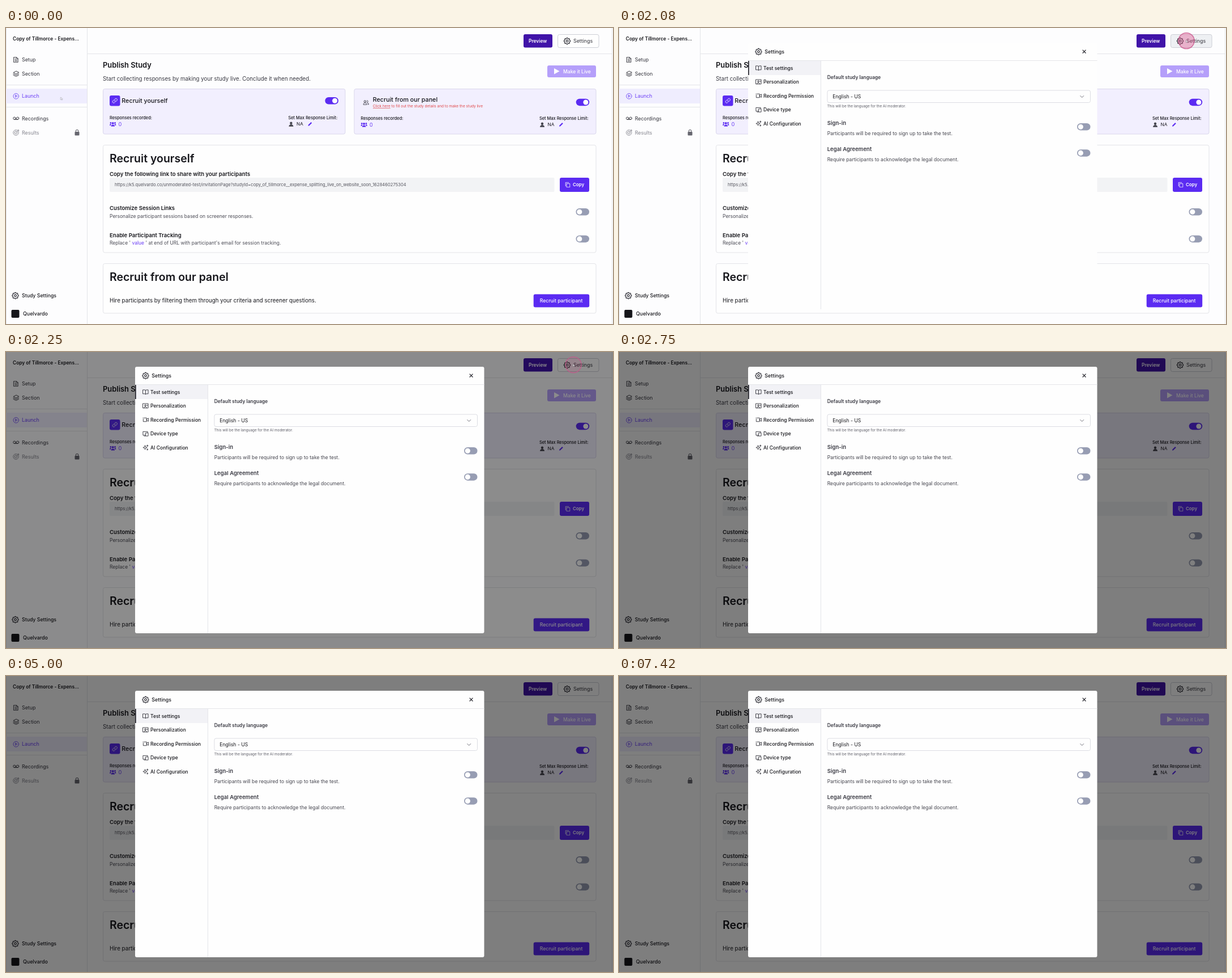
These frames come from a looping animation (1072x522 px, 8000 ms). An HTML page:

```html
<!DOCTYPE html>
<html lang="en">
<head>
<meta charset="utf-8">
<title>Study settings</title>
<style>
  html, body { margin: 0; width: 100%; height: 100%; overflow: hidden; background: #fdfdfe; }
  svg.stage { display: block; width: 100%; height: 100%; }
  text { font-family: Inter, "Open Sans", sans-serif; font-optical-sizing: none; fill: #17171c; }
  .h1 { font-size: 19.5px; font-weight: 600; }
  .h2 { font-size: 12.9px; font-weight: 600; }
  .h3 { font-size: 10.75px; font-weight: 500; }
  .h4 { font-size: 9.57px; font-weight: 600; }
  .lead { font-size: 9.78px; }
  .body { font-size: 8.5px; fill: #4a4a54; }
  .note { font-size: 8.64px; fill: #45454e; }
  .nav { font-size: 8.9px; fill: #33333b; }
  .tab { font-size: 8.57px; font-weight: 500; }
  .label { font-size: 7.4px; font-weight: 500; }
  .tiny { font-size: 6.5px; }
  .btn { font-size: 8.6px; font-weight: 500; fill: #fff; }
  .bold { font-weight: 600; }
  .violet { fill: #6a3df5; }
  .muted { fill: #85858e; }
  .soft { fill: #3a3a43; }
  .panel { fill: #fefefe; stroke: #e3e4e8; }
  .card { fill: #f2effe; stroke: #dad7ec; }
  .rule { stroke: #e4e5e9; fill: none; }
  .main { fill: #5b2bf2; }
  .ico { fill: none; stroke: #2b2b33; stroke-width: 1.9; stroke-linecap: round; stroke-linejoin: round; }
  .ico.purple { stroke: #6f49f5; }
  .ico.grey { stroke: #85858e; }
  .ico.white { stroke: #fff; }

  .hover, .dim, .modal, .ring, .fill, .cursor { animation: 8s linear infinite; }
  .hover { animation-name: hover; }
  .dim { animation-name: dim; }
  .modal { animation-name: modal; }
  .ring { animation-name: ring; transform-origin: 1002px 22.5px; }
  .fill { animation-name: fill; }
  .cursor { animation-name: travel; }

  @keyframes hover {
    0%, 14.9% { fill: #fefefe; }
    15%, 26.9% { fill: #eef0f3; }
    27%, 100% { fill: #fefefe; }
  }
  @keyframes modal {
    0%, 24.5% { opacity: 0; }
    25.75%, 100% { opacity: 1; }
  }
  @keyframes dim {
    0%, 26% { opacity: 0; }
    27.125% { opacity: .17; }
    28.125% { opacity: .45; }
    29.25%, 100% { opacity: .5; }
  }
  @keyframes ring {
    0%, 23.9% { opacity: 0; transform: scale(.4); }
    25% { opacity: 1; transform: scale(1); }
    28.2% { opacity: .85; transform: scale(1); }
    30.25%, 100% { opacity: 0; transform: scale(1.04); }
  }
  @keyframes fill {
    0%, 27.2% { opacity: 1; }
    28.2% { opacity: .3; }
    29.5%, 100% { opacity: 0; }
  }
  @keyframes travel {
    0%, 1% { transform: translate(96.5px, 122px); opacity: .7; animation-timing-function: cubic-bezier(.45, 0, .3, 1); }
    15.6%, 29% { transform: translate(1001px, 21px); opacity: .7; }
    30.25%, 100% { transform: translate(1001px, 21px); opacity: 0; }
  }
</style>
</head>
<body>
<svg class="stage" viewBox="0 0 1072 522" xmlns="http://www.w3.org/2000/svg">
  <defs>
    <symbol id="gear" viewBox="0 0 24 24">
      <path d="M10.3 4.3c.4-1.8 2.9-1.8 3.4 0a1.7 1.7 0 0 0 2.6 1.1c1.5-.9 3.3.8 2.4 2.4a1.7 1.7 0 0 0 1 2.5c1.8.4 1.8 2.9 0 3.4a1.7 1.7 0 0 0-1 2.6c.9 1.5-.8 3.3-2.4 2.4a1.7 1.7 0 0 0-2.6 1c-.4 1.8-2.9 1.8-3.4 0a1.7 1.7 0 0 0-2.6-1c-1.5.9-3.3-.8-2.4-2.4a1.7 1.7 0 0 0-1-2.6c-1.8-.4-1.8-2.9 0-3.4a1.7 1.7 0 0 0 1-2.5c-.9-1.5.8-3.3 2.4-2.4 1 .6 2.3.1 2.6-1.1z"/>
      <circle cx="12" cy="12" r="3"/>
    </symbol>
    <symbol id="file" viewBox="0 0 24 24"><path d="M4 2.5h11l5 5v14H4zM14.5 3v5H20M8 8h3M8 12.5h8M8 17h8"/></symbol>
    <symbol id="layers" viewBox="0 0 24 24"><path d="M12 2.5 2 7.5l10 5 10-5zM2 12.2l10 5 10-5M2 16.8l10 5 10-5"/></symbol>
    <symbol id="play" viewBox="0 0 24 24"><circle cx="12" cy="12" r="10"/><path d="M9.5 8v8l6.5-4z"/></symbol>
    <symbol id="tape" viewBox="0 0 24 24"><circle cx="6" cy="12" r="4.5"/><circle cx="18" cy="12" r="4.5"/><path d="M6 16.5h12"/></symbol>
    <symbol id="target" viewBox="0 0 24 24"><path d="M21 9a10 10 0 1 1-6-6M16.5 11a5 5 0 1 1-3.5-3.7M12 12l6-6V3l3-1v2h2l-2 3h-3"/></symbol>
    <symbol id="link" viewBox="0 0 24 24"><path d="M10 13.5a5 5 0 0 0 7.5.5l3-3a5 5 0 0 0-7-7l-1.8 1.7M14 10.5a5 5 0 0 0-7.5-.5l-3 3a5 5 0 0 0 7 7l1.7-1.7"/></symbol>
    <symbol id="copy" viewBox="0 0 24 24"><path d="M8 7h13v15H8zM4 17H3V2h13v1"/></symbol>
    <symbol id="people" viewBox="0 0 24 24"><circle cx="8" cy="8" r="4"/><path d="M1 20c0-9 14-9 14 0zM16 4a4 4 0 0 1 0 8M18 14c3 0 5 2 5 6h-4"/></symbol>
    <symbol id="book" viewBox="0 0 24 24"><path d="M12 5v16M2 4h7l3 2 3-2h7v15h-7l-3 2-3-2H2z"/></symbol>
    <symbol id="badge" viewBox="0 0 24 24"><path d="M2 3h20v17H2zM6 20c0-7 10-7 10 0M19 8v4"/><circle cx="11" cy="10" r="3"/></symbol>
    <symbol id="camera" viewBox="0 0 24 24"><path d="M6 5h10v14H3V9M16 10l7-4v12l-7-4zM2 5h1"/></symbol>
    <symbol id="devices" viewBox="0 0 24 24"><path d="M11 18H2V4h18v3M13 9h9v12h-9zM6 21h5"/></symbol>
    <symbol id="spark" viewBox="0 0 24 24"><path d="M10 4l2 6 6 2-6 2-2 6-2-6-6-2 6-2zM19 2v6M16 5h6M19 17v5M16.5 19.5h5"/></symbol>
    <symbol id="group" viewBox="0 0 24 18">
      <circle cx="12" cy="5" r="4"/><circle cx="4" cy="4" r="2.8"/><circle cx="20" cy="4" r="2.8"/>
      <path d="M5 17c0-9 14-9 14 0zM0 13c0-6 5-6 6.5-4L4 13zM24 13c0-6-5-6-6.5-4l2.5 4z"/>
    </symbol>
    <g id="user"><circle cx="4" cy="2.2" r="2.2"/><path d="M0 8.3c0-5 8-5 8 0z"/></g>
    <path id="pencil" d="M0 7 .4 5 5.2.2 6.8 1.8 2 6.6z"/>
    <g id="on"><rect width="23.5" height="12.5" rx="6.25" class="main"/><circle cx="17.2" cy="6.25" r="4.5" fill="#fff"/></g>
    <g id="off"><rect width="23.5" height="12.5" rx="6.25" fill="#979db3"/><circle cx="6.3" cy="6.25" r="4.6" fill="#fff"/></g>
    <g id="stats">
      <text class="label" x="12" y="54">Responses recorded:</text>
      <use href="#group" x="12" y="58.5" width="11.5" height="8.6" class="main"/>
      <text class="violet" font-size="9.2" x="27.5" y="66">0</text>
      <text class="label" x="327.5" y="53.5">Set Max Response Limit:</text>
      <use href="#user" x="328.5" y="58.5" fill="#45454e"/>
      <text font-size="8.2" x="342" y="65">NA</text>
      <use href="#pencil" x="362.5" y="58.7" class="main"/>
    </g>
  </defs>

  <rect width="1072" height="522" fill="#fdfdfe"/>
  <path class="rule" d="M143.5 0V522M143 45.5H1070M0 100.5H143M0 139.5H143M1070.5 0V522M.5 0V522"/>

  <!-- sidebar -->
  <rect x="0" y="107" width="143" height="26" fill="#efedfe"/>
  <text class="bold" font-size="8.35" x="12" y="22.3">Copy of Tillmorce - Expens...</text>
  <g class="ico">
    <use href="#file" x="12" y="50.5" width="11" height="11"/>
    <use href="#layers" x="12" y="75" width="11.5" height="11.5"/>
    <use href="#play" class="ico purple" x="12" y="114.5" width="11.5" height="11.5"/>
    <use href="#tape" x="12" y="153.5" width="11.5" height="11.5"/>
    <use href="#target" class="ico grey" x="12" y="178.5" width="11.5" height="11.5"/>
    <use href="#gear" x="9" y="464.5" width="15" height="15"/>
  </g>
  <text class="nav" x="28" y="58.8">Setup</text>
  <text class="nav" x="28" y="83.8">Section</text>
  <text class="nav violet" x="28" y="123.2">Launch</text>
  <text class="nav" x="28" y="162.6">Recordings</text>
  <text class="nav muted" x="28" y="187.6">Results</text>
  <rect x="121.5" y="183" width="8" height="6.5" rx="1" fill="#66666f"/>
  <path d="M123.3 183v-1.3a2.2 2.2 0 0 1 4.4 0v1.3" fill="none" stroke="#66666f" stroke-width="1.1"/>
  <text class="tab" style="font-size:8.75px" x="28" y="474.8">Study Settings</text>
  <rect x="9.5" y="497" width="14" height="14" rx="2" fill="#16161a"/>
  <text class="tab" style="font-size:8.9px" x="30" y="507">Quelvardo</text>

  <!-- top bar -->
  <rect x="914" y="11" width="51" height="23.5" rx="3" fill="#4013a8"/>
  <text class="btn bold" style="font-size:8.4px" x="923" y="25.6">Preview</text>
  <rect class="hover" x="974.5" y="11.5" width="72.5" height="23" rx="3" fill="#fefefe" stroke="#cdcfd6"/>
  <use href="#gear" class="ico" x="983.5" y="15.5" width="15" height="15"/>
  <text class="nav" x="1002" y="25.8">Settings</text>

  <text class="h2" x="171" y="69.6">Publish Study</text>
  <text class="lead soft" x="171" y="93">Start collecting responses by making your study live. Conclude it when needed.</text>
  <rect x="956" y="66" width="86" height="21" rx="3" fill="#b59ffa"/>
  <path d="M968 71v10.5l9.5-5.25z" fill="#fff"/>
  <text class="btn" x="984" y="79.8">Make it Live</text>

  <!-- cards -->
  <rect class="card" x="171.5" y="107.5" width="427.5" height="79.5" rx="3"/>
  <rect class="main" x="183" y="119" width="18.5" height="18.5" rx="3"/>
  <use href="#link" class="ico white" x="187" y="123" width="10.5" height="10.5"/>
  <text class="h3" x="204.3" y="132.2">Recruit yourself</text>
  <use href="#on" x="563.5" y="122"/>
  <use href="#stats" x="171" y="107"/>

  <rect class="card" x="615" y="107.5" width="427" height="79.5" rx="3"/>
  <use href="#people" class="ico" x="630.5" y="126" width="10.5" height="10.5"/>
  <text class="h3" x="647.7" y="130">Recruit from our panel</text>
  <text class="tiny" style="fill:#e04848" x="648" y="140.3"><tspan text-decoration="underline">Click here</tspan> to fill out the study details and to make the study live</text>
  <use href="#on" x="1006.7" y="124.7"/>
  <use href="#stats" x="614.5" y="108"/>

  <!-- share link -->
  <rect class="panel" x="171.5" y="206.5" width="870.5" height="189.5" rx="3"/>
  <text class="h1" x="183" y="237.2">Recruit yourself</text>
  <text class="h4" x="183" y="260.5">Copy the following link to share with your participants</text>
  <rect x="183" y="264" width="785.5" height="25" rx="2" fill="#f2f3f5"/>
  <text font-size="7.62" style="fill:#55555e" x="192" y="278.7">https://k5.quelvardo.co/unmoderated-test/invitationPage?studyId=copy_of_tillmorce__expense_splitting_live_on_website_soon_1628460275304</text>
  <rect class="main" x="978" y="264" width="52" height="25" rx="3"/>
  <use href="#copy" class="ico white" x="987" y="271.5" width="10" height="10"/>
  <text class="btn bold" style="font-size:7.9px" x="1001" y="279.3">Copy</text>
  <text class="h4" x="183" y="321">Customize Session Links</text>
  <text class="body" x="183" y="334.5">Personalize participant sessions based on screener responses.</text>
  <use href="#off" x="1006.5" y="318"/>
  <text class="h4" x="183" y="369">Enable Participant Tracking</text>
  <text class="body" x="183" y="382">Replace ' <tspan class="violet">value</tspan> ' at end of URL with participant's email for session tracking.</text>
  <use href="#off" x="1006.5" y="365.7"/>

  <!-- hire -->
  <rect class="panel" x="171.5" y="415.5" width="870.5" height="87.5" rx="3"/>
  <text class="h1" x="183" y="446.4">Recruit from our panel</text>
  <text class="lead" x="183" y="484">Hire participants by filtering them through your criteria and screener questions.</text>
  <rect class="main" x="931.7" y="469.5" width="98.5" height="23" rx="3"/>
  <text class="btn" x="942.8" y="484">Recruit participant</text>

  <rect class="dim" width="1072" height="522"/>

  <!-- settings dialog -->
  <g class="modal">
    <rect x="228" y="26" width="616.5" height="470" rx="3" fill="#fefefe"/>
    <use href="#gear" class="ico" x="239" y="34.3" width="15" height="15"/>
    <text class="tab" style="font-size:8.9px" x="257.3" y="45">Settings</text>
    <path d="M818.7 38.7l5.8 5.8m0-5.8l-5.8 5.8" stroke="#24242b" stroke-width="1.2"/>
    <rect x="228" y="58" width="128" height="25" fill="#f2f2f6"/>
    <rect x="228" y="58" width="1.7" height="25" fill="#24242c"/>
    <path class="rule" d="M228 57.5H844.5M356.5 58V496"/>
    <g class="ico">
      <use href="#book" x="241" y="65" width="11" height="11"/>
      <use href="#badge" x="241" y="89.6" width="11" height="11"/>
      <use href="#camera" x="241" y="114" width="11" height="11"/>
      <use href="#devices" x="241" y="138.5" width="11" height="11"/>
      <use href="#spark" x="241" y="163" width="11" height="11"/>
    </g>
    <text class="tab" x="255" y="73.7">Test settings</text>
    <text class="tab" x="255" y="98.2">Personalization</text>
    <text class="tab" x="255" y="122.7">Recording Permission</text>
    <text class="tab" x="255" y="147.2">Device type</text>
    <text class="tab" x="255" y="171.7">AI Configuration</text>

    <text class="bold soft" font-size="8.45" x="367.7" y="89.7">Default study language</text>
    <rect x="368" y="110" width="464.5" height="21.5" rx="3" fill="#fefefe" stroke="#dcdde3"/>
    <text font-size="8.6" x="377.3" y="123.9">English - US</text>
    <path d="M814.5 119.3l3.2 3.2 3.2-3.2" fill="none" stroke="#6d6d77"/>
    <text class="tiny" style="font-size:6.4px;fill:#5d5d67" x="367.7" y="140.3">This will be the language for the AI moderator.</text>
    <text class="h4 soft" x="367.7" y="171.2">Sign-in</text>
    <text class="note" x="367.7" y="188.7">Participants will be required to sign up to take the test.</text>
    <use href="#off" x="809" y="168"/>
    <text class="h4 soft" x="367.7" y="217.3">Legal Agreement</text>
    <text class="note" x="367.7" y="234.9">Require participants to acknowledge the legal document.</text>
    <use href="#off" x="809" y="214.2"/>
  </g>

  <!-- pointer -->
  <g class="ring">
    <circle class="fill" cx="1002" cy="22.5" r="14" fill="#e0508c" fill-opacity=".42"/>
    <circle cx="1002" cy="22.5" r="14" fill="none" stroke="#c9568c" stroke-width="1.3"/>
  </g>
  <path class="cursor" d="M0 0v4.6l1.2-1 1 1.6.7-.4-.8-1.5 1.5-.1z" fill="#fff" stroke="#77777f" stroke-width=".6"/>
</svg>
</body>
</html>
```
